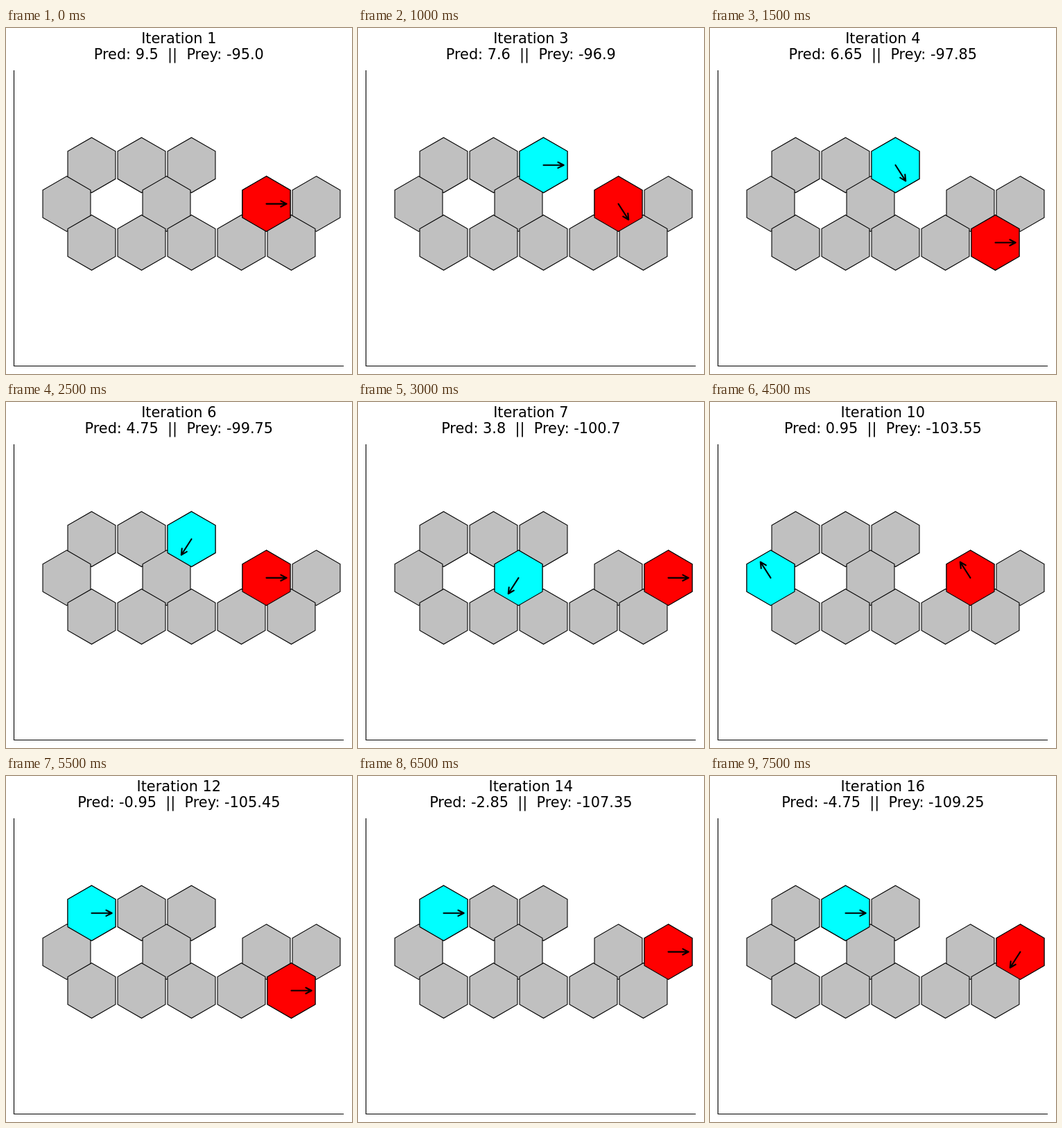
These frames come from a looping animation (499 px wide and 499 px high, 8000 ms). An HTML page with a canvas:

```html
<!DOCTYPE html>
<html lang="en">
<head>
<meta charset="utf-8">
<title>Predator and prey</title>
<style>
  html, body { margin: 0; width: 100%; height: 100%; overflow: hidden; background: #fff; }
  canvas { display: block; width: 499px; height: 499px; }
</style>
</head>
<body>
<canvas id="stage" width="499" height="499"></canvas>
<script>
const ctx = document.getElementById("stage").getContext("2d");
const STEP = 500;
const RADIUS = 39.8;
const ROW_Y = { A: 197.7, B: 253.6, C: 309.5 };
const ROW_X = { A: 123.5, B: 87.5, C: 123.5 };
const CELLS = "A0 A1 A2 B0 B2 B4 B5 C0 C1 C2 C3 C4".split(" ");

// One entry per iteration: cell, then heading.
const PREDATOR = ("B4 E,B4 NW,B4 SE,C4 E,C4 NW,B4 E,B5 E,B5 W," +
  "B5 W,B4 NW,B4 SE,C4 E,C4 NE,B5 E,B5 E,B5 SW").split(",");
const PREY = ("B4 E,A2 E,A2 E,A2 SE,A2 E,A2 SW,B2 SW,C1 W," +
  "C0 NW,B0 NW,A0 E,A0 E,A0 E,A0 E,A1 E,A1 E").split(",");

function center(cell) {
  return [ROW_X[cell[0]] + 72 * cell[1], ROW_Y[cell[0]]];
}

function hexagon(cell, fill) {
  const [x, y] = center(cell);
  ctx.beginPath();
  for (let i = 0; i < 6; i++) {
    const a = (i * 60 - 90) * Math.PI / 180;
    ctx.lineTo(x + RADIUS * Math.cos(a), y + RADIUS * Math.sin(a));
  }
  ctx.closePath();
  ctx.fillStyle = fill;
  ctx.fill();
  ctx.lineWidth = 1.1;
  ctx.lineJoin = "miter";
  ctx.stroke();
}

function arrow(cell, heading) {
  const side = heading.includes("E") ? 1 : -1;
  const rise = heading[0] === "N" ? -1 : heading[0] === "S" ? 1 : 0;
  const angle = rise ? Math.atan2(rise * 56, side * 36) : Math.atan2(0, side);
  const tip = rise ? 27.2 : 29.2;
  ctx.save();
  ctx.translate(...center(cell));
  ctx.rotate(angle);
  ctx.lineWidth = 2.1;
  ctx.lineCap = ctx.lineJoin = "round";
  ctx.beginPath();
  ctx.moveTo(0, 0);
  ctx.lineTo(tip, 0);
  ctx.moveTo(tip - 8.3, -4.2);
  ctx.lineTo(tip, 0);
  ctx.lineTo(tip - 8.3, 4.2);
  ctx.stroke();
  ctx.restore();
}

function agent(state, fill) {
  const [cell, heading] = state.split(" ");
  hexagon(cell, fill);
  arrow(cell, heading);
}

function score(start, step) {
  const cents = Math.round(start * 100) - 95 * step;
  return (cents / 100).toFixed(2).replace(/0$/, "");
}

function title(step) {
  ctx.font = '20.83px "DejaVu Sans", sans-serif';
  ctx.textAlign = "center";
  ctx.fillStyle = "#000";
  ctx.fillText("Iteration " + (step + 1), 249.3, 22);
  ctx.fillText(`Pred: ${score(9.5, step)}  ||  Prey: ${score(-95, step)}`, 249.3, 45);
}

function axes() {
  ctx.lineWidth = 1.1;
  ctx.lineCap = "square";
  ctx.lineJoin = "miter";
  ctx.beginPath();
  ctx.moveTo(11.5, 61.5);
  ctx.lineTo(11.5, 487.5);
  ctx.lineTo(486.5, 487.5);
  ctx.stroke();
}

function draw(step) {
  ctx.fillStyle = "#fff";
  ctx.fillRect(0, 0, 499, 499);
  ctx.strokeStyle = "#000";
  axes();
  for (const cell of CELLS) hexagon(cell, "#c0c0c0");
  agent(PREY[step], "#0ff");
  agent(PREDATOR[step], "#f00");
  title(step);
}

const start = performance.now();
function tick() {
  const elapsed = Math.max(0, performance.now() - start);
  draw(Math.floor(elapsed / STEP) % PREDATOR.length);
  requestAnimationFrame(tick);
}
tick();
</script>
</body>
</html>
```
